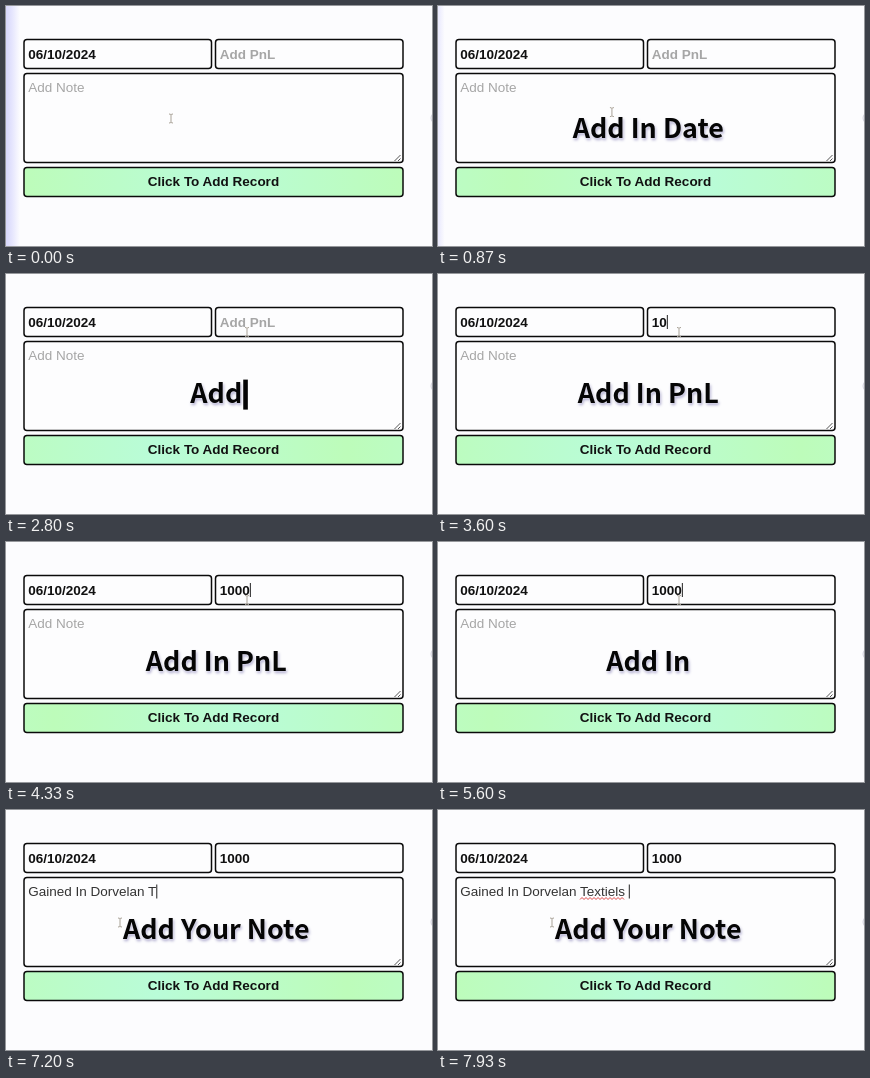
Animation of 426x240 px, one loop 8 s. Source, as an HTML page:

```html
<!DOCTYPE html>
<html lang="en">
<head>
<meta charset="utf-8">
<title>Add a record</title>
<style>
  html, body { margin: 0; width: 100%; height: 100%; overflow: hidden; background: #fcfcfe; }
  svg { display: block; width: 100vw; height: 100vh; }
  text { white-space: pre; font: 13.5px "Liberation Sans", Arial, sans-serif; fill: #333; }
  .bold { font-weight: 700; fill: #111; }
  .hint { fill: #a6a6a6; }
  .box { fill: #fdfdfe; stroke: #0a0a0a; stroke-width: 1.5; }
  #title {
    font: 700 26.9px "Noto Sans CJK JP", "Noto Sans CJK SC", "Noto Sans CJK", "Noto Sans", sans-serif;
    fill: #050505; text-anchor: middle;
    text-shadow: 0 0 2px #fff, 1px 2px 3px #aaa6cc;
  }
</style>
</head>
<body>
<svg viewBox="0 0 426 240">
  <defs>
    <linearGradient id="edge">
      <stop offset="0" stop-color="#d6d6fb"/>
      <stop offset=".45" stop-color="#e6e6fd"/>
      <stop offset="1" stop-color="#fcfcfe"/>
    </linearGradient>
    <linearGradient id="mint" gradientUnits="userSpaceOnUse" x1="0" x2="190" spreadMethod="reflect">
      <stop offset="0" stop-color="#bdfcba"/>
      <stop offset="1" stop-color="#b9fcd8"/>
    </linearGradient>
  </defs>
  <rect width="426" height="240" fill="#fcfcfe"/>
  <rect id="strip" width="14" height="240" fill="url(#edge)"/>
  <circle cx="431" cy="112" r="6" fill="#f0f0f6" stroke="#d3d3dd"/>

  <rect class="box" x="18" y="33.5" width="187.5" height="29" rx="3"/>
  <rect class="box" x="209.5" y="33.5" width="187.5" height="29" rx="3"/>
  <rect class="box" x="18" y="67.5" width="379" height="89" rx="3"/>
  <rect class="box" x="18" y="161.5" width="379" height="29" rx="3" style="fill:url(#mint)"/>
  <path d="M388.5 155l6-6M392 155l2.5-2.5" stroke="#555"/>

  <text class="bold" x="22.2" y="53">06/10/2024</text>
  <text class="bold" x="207.5" y="180" text-anchor="middle">Click To Add Record</text>
  <text id="pnl" x="213.8" y="53"></text>
  <text id="note" x="22.2" y="85.8"></text>
  <path id="squiggle" fill="none" stroke="#e04848" stroke-width="1"/>
  <rect id="fieldCaret" width="1" height="14" fill="#222"/>
  <path id="mouse" d="M-2-4.5Q0-4.5 0-3.5Q0-4.5 2-4.5M0-3.5V3.5M-2 4.5Q0 4.5 0 3.5Q0 4.5 2 4.5"
    fill="none" stroke="#a9a297" stroke-width="1"/>
  <text id="title" x="210.3"></text>
  <rect id="titleCaret" width="4.6" height="30" fill="#050505"/>
</svg>
<script>
const LOOP = 8000;
const $ = id => document.getElementById(id);
const clamp = (v, lo = 0, hi = 1) => Math.min(hi, Math.max(lo, v));
const ease = (t, from, to) => {
  const p = clamp((t - from) / (to - from));
  return p * p * (3 - 2 * p);
};
const typed = (t, start, step, length) => clamp(Math.floor((t - start) / step), 0, length);
const show = (el, on) => el.setAttribute('visibility', on ? 'visible' : 'hidden');
const place = (el, x, y) => { el.setAttribute('x', x); el.setAttribute('y', y); };

const KEY = 54;
const titles = [
  { text: 'Add In Date', from: 200, erase: 1960, y: 131.5 },
  { text: 'Add In PnL', from: 2630, erase: 5370, y: 128.6 },
  { text: 'Add Your Note', from: 5980, erase: Infinity, y: 128.6 }
];
const lead = 'Gained In Dorvelan ';
const lastWord = 'Textiels';
const noteText = lead + lastWord + ' ';

function drawTitle(t) {
  const clip = titles.filter(c => t >= c.from).pop();
  const el = $('title');
  if (!clip) {
    el.textContent = '';
    show($('titleCaret'), false);
    return;
  }
  const { text, from, erase, y } = clip;
  const size = text.length;
  const count = typed(t, from, KEY, size) - typed(t, erase, KEY, size);
  el.textContent = text.slice(0, count);
  el.setAttribute('y', y);
  const moving = count > 0 && count < size;
  show($('titleCaret'), moving && t % 600 >= 250 && t % 600 < 500);
  place($('titleCaret'), 211.3 + el.getComputedTextLength() / 2, y - 23);
}

function fill(el, value, hint, style) {
  el.textContent = value || hint;
  el.setAttribute('class', style + (value ? '' : ' hint'));
}

function drawFields(t) {
  const pnl = '1000'.slice(0, typed(t, 3200, 150, 4));
  const count = typed(t, 5880, 65, noteText.length);
  const note = noteText.slice(0, count);
  fill($('pnl'), pnl, 'Add PnL', 'bold');
  fill($('note'), note, 'Add Note', '');

  const inNote = t >= 5850;
  const field = inNote ? $('note') : $('pnl');
  const width = (inNote ? note : pnl) ? field.getComputedTextLength() : 0;
  show($('fieldCaret'), t >= 3050);
  place($('fieldCaret'), +field.getAttribute('x') + width, inNote ? 74.5 : 41);

  const done = count === noteText.length;
  show($('squiggle'), done);
  if (done) {
    const x = 22.2 + $('note').getSubStringLength(0, lead.length);
    const length = $('note').getSubStringLength(lead.length, lastWord.length);
    $('squiggle').setAttribute('d', `M${x} 89.5` + 'l2-2l2 2'.repeat(Math.round(length / 4)));
  }
}

function drawMouse(t) {
  const a = ease(t, 700, 1500), b = ease(t, 5620, 5850);
  const x = 165 + 76 * a - 127 * b;
  const y = 112.5 - 54.5 * a + 54.5 * b;
  $('mouse').setAttribute('transform', `translate(${x} ${y})`);
}

function draw(t) {
  $('strip').setAttribute('x', -14 * ease(t, 0, 1700));
  const shift = 60 * Math.sin(2 * Math.PI * t / 4000);
  $('mint').setAttribute('gradientTransform', `translate(${18 + shift} 0)`);
  drawFields(t);
  drawMouse(t);
  drawTitle(t);
}

const begin = performance.now();
function tick() {
  draw((performance.now() - begin) % LOOP);
  requestAnimationFrame(tick);
}
tick();
</script>
</body>
</html>
```
